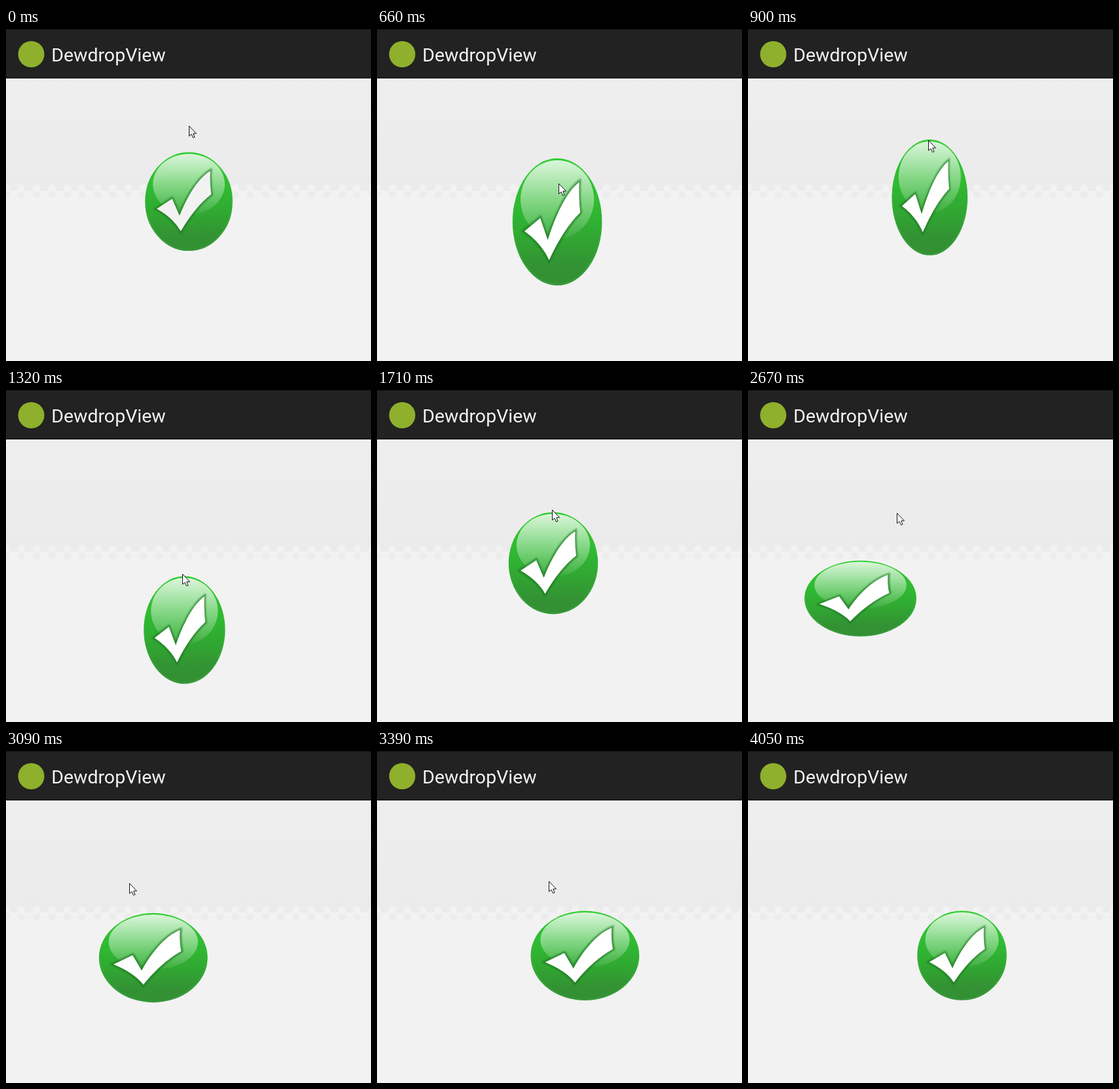
Recreate the animation shown at these times as an HTML page. Size 557 by 508 pixels, loop 4.21 s.

```html
<!DOCTYPE html>
<html lang="en">
<head>
<meta charset="utf-8">
<title>DewdropView</title>
<style>
html, body { margin: 0; width: 100%; height: 100%; overflow: hidden; background: #f2f2f2; }
svg { display: block; }
text { font: 28.5px Roboto, "Noto Sans", sans-serif; fill: #f3f3f3; }
</style>
</head>
<body>
<svg width="557" height="508" viewBox="0 0 557 508">
  <defs>
    <linearGradient id="wall" x2="0" y2="1">
      <stop stop-color="#eeeeee"/><stop offset="1" stop-color="#ebebeb"/>
    </linearGradient>
    <linearGradient id="body" x2="0" y2="1">
      <stop stop-color="#35c935"/><stop offset=".4" stop-color="#2fb832"/>
      <stop offset=".65" stop-color="#31a532"/><stop offset=".85" stop-color="#339233"/>
      <stop offset="1" stop-color="#338f33"/>
    </linearGradient>
    <linearGradient id="rim" x2="0" y2="1">
      <stop stop-color="#2fcc2f"/><stop offset=".6" stop-color="#30ae32"/>
      <stop offset="1" stop-color="#36983a"/>
    </linearGradient>
    <linearGradient id="gloss" x2="0" y2="1">
      <stop stop-color="#fff" stop-opacity=".82"/><stop offset=".5" stop-color="#fff" stop-opacity=".42"/>
      <stop offset="1" stop-color="#fff" stop-opacity=".06"/>
    </linearGradient>
    <filter id="soft" x="-20%" y="-20%" width="140%" height="140%"><feGaussianBlur stdDeviation="1"/></filter>
    <path id="check" d="M-50 10L-26-4-14.5 19.5C-4-4 13-32 33.5-42.5Q32.5-25 35-10Q10 7-12.5 41Q-24 23-50 10Z"/>
  </defs>

  <rect width="557" height="508" fill="#f2f2f2"/>
  <rect y="77" width="557" height="171" fill="url(#wall)"/>
  <g id="dots"></g>
  <rect width="557" height="77" fill="#222"/>
  <rect width="557" height="2" fill="#000"/>
  <rect y="75" width="557" height="2" fill="#191919"/>
  <circle cx="38.5" cy="40" r="20" fill="#8fb02c"/>
  <text x="69.2" y="51">DewdropView</text>

  <g id="drop">
    <circle r="67" fill="url(#body)" stroke="url(#rim)" stroke-width="2.4"/>
    <ellipse cy="-24" rx="56" ry="42" fill="url(#gloss)"/>
    <use href="#check" fill="#1c7420" stroke="#1c7420" stroke-width="5" opacity=".65" filter="url(#soft)"/>
    <use id="mark" href="#check"/>
  </g>
  <path id="cursor" d="M.5.5V16L4 13 6.5 18.5 9 17.5 6.7 12H11.5Z" stroke="#11111c"/>
</svg>
<script>
const LOOP = 4210, LAST = 30, SIZE = 137, STRETCH = 59;
const $ = id => document.getElementById(id);

// Turning points of the drop and the pointer: step, x, y
const dropTurns = [
  [-1, 279, 270], [1.5, 279, 255], [3.5, 271, 372], [6.2, 278, 242], [9.5, 273, 361],
  [11.3, 269, 398], [13.2, 269, 262], [14.9, 270, 376], [17.1, 257, 249], [19.5, 159, 320],
  [22, 291, 316], [23.2, 220, 317], [24, 190, 317], [25.2, 326.5, 313.5]
];
const pointerTurns = [
  [0, 279, 149], [4.1, 277, 285], [6.2, 276, 162], [11, 268, 296], [13.2, 267, 182],
  [14.9, 266, 265], [16, 264, 163], [20, 227, 189], [23, 188, 203], [25, 262, 200],
  [27, 511, 454], [28, 511, 454], [29, 511, 474]
];

// Screen updates come on a 30 ms grid and slow down a little over the loop
const stepStart = i => Math.round((127 * i + 0.27 * i * i + 10) / 30) * 30;

function stepAt(t) {
  let i = 0;
  while (i < LAST && t >= stepStart(i + 1)) i++;
  return i;
}

// Eased place between two turning points, with the way travelled
function moveAt(turns, step) {
  const k = turns.findIndex(p => p[0] >= step);
  if (k < 1) {
    const [, x, y] = turns.at(k);
    return { x, y, dx: 0, dy: 0, u: 1 };
  }
  const [t0, x0, y0] = turns[k - 1], [t1, x1, y1] = turns[k];
  const u = (step - t0) / (t1 - t0), f = (1 - Math.cos(Math.PI * u)) / 2;
  const dx = x1 - x0, dy = y1 - y0;
  return { x: x0 + dx * f, y: y0 + dy * f, dx, dy, u };
}

function draw(step) {
  // The drop stretches along its way with speed and pinches across it while speeding up
  const { x, y, dx, dy, u } = moveAt(dropTurns, step);
  const way = Math.hypot(dx, dy), across = way ? (dx / way) ** 2 : 0, down = 1 - across;
  const stretch = Math.min(STRETCH, way) * Math.sin(Math.PI * u);
  const pinch = stretch * Math.max(0, 1 - 2 * u);
  const w = SIZE + stretch * across - pinch * down;
  const h = SIZE + stretch * down - pinch * across;
  $("drop").setAttribute("transform", `translate(${x} ${y}) scale(${w / SIZE} ${h / SIZE})`);
  $("mark").setAttribute("fill", step ? "#fff" : "#f2f2f2");

  const p = moveAt(pointerTurns, step), cursor = $("cursor");
  cursor.setAttribute("visibility", step < LAST ? "visible" : "hidden");
  cursor.setAttribute("fill", step ? "#fff" : "#ededed");
  cursor.setAttribute("transform", `translate(${Math.round(p.x)} ${Math.round(p.y)})`);
}

function tick() {
  draw(stepAt(performance.now() % LOOP));
  requestAnimationFrame(tick);
}

const dot = (x, y, fill) => `<circle cx="${x}" cy="${y}" r="5.7" fill="${fill}"/>`;
for (let x = 0; x < 570; x += 23.3)
  $("dots").innerHTML += dot(x, 254, "#ececec") + dot(x, 244, "#f2f2f2");

tick();
</script>
</body>
</html>
```
